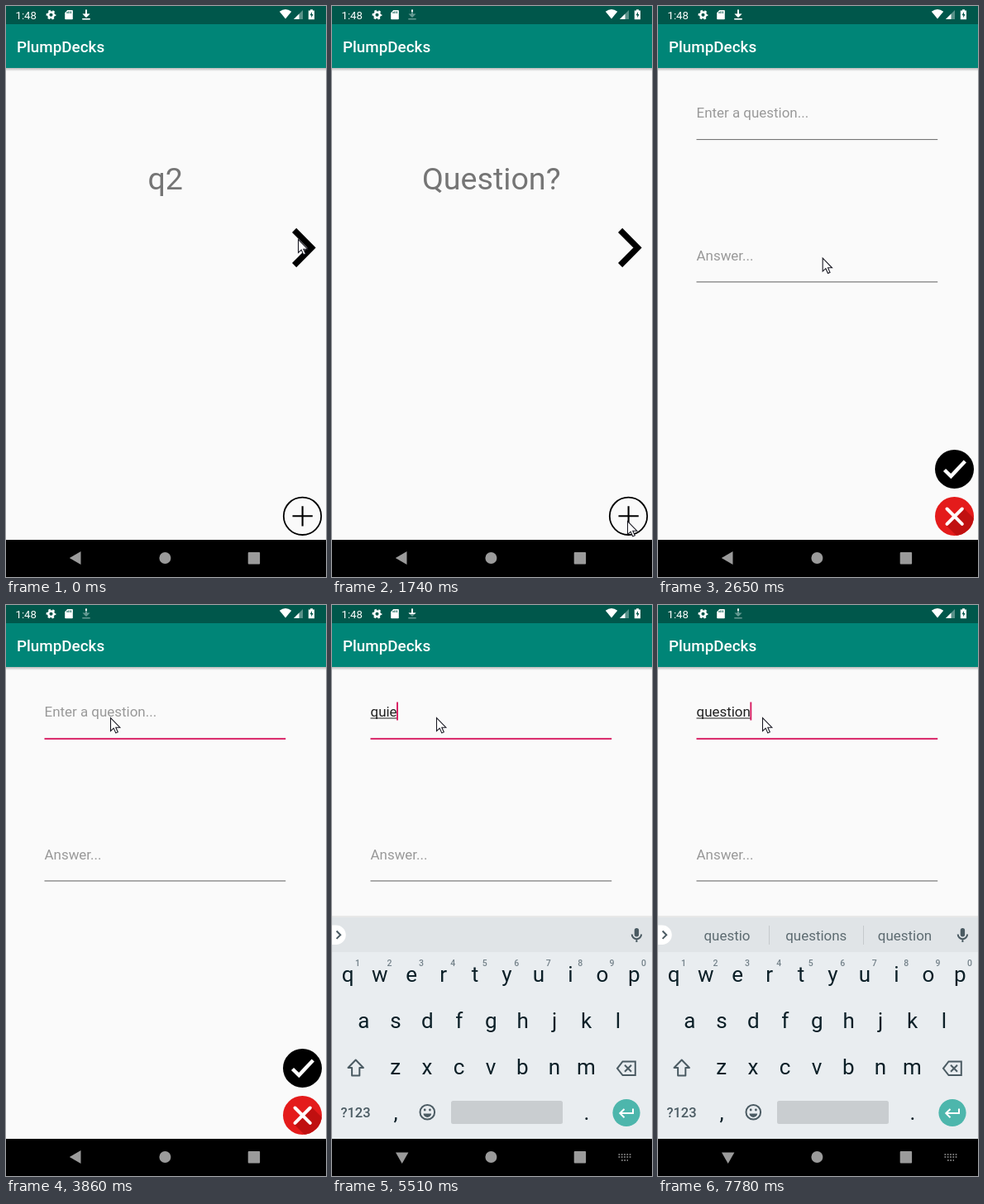
An HTML page for the animation above (8000 ms loop, 387 px wide and 691 px high).

```html
<!DOCTYPE html>
<html lang="en">
<head>
<meta charset="utf-8">
<title>Flash card app</title>
<style>
  html, body { margin: 0; width: 100%; height: 100%; overflow: hidden; background: #000; }
  svg { display: block; width: 387px; height: 691px; font-family: Roboto, sans-serif; }
  .title { font-size: 18.83px; font-weight: 500; fill: #fff; }
  .card { font-size: 37.64px; fill: #757575; text-anchor: middle; }
  .field { font-size: 16.94px; }
  .hint { fill: #999; }
  .mid { text-anchor: middle; }
  .key { font-size: 26px; fill: #0b1f27; text-anchor: middle; }
  .digit { font-size: 10.5px; font-weight: 500; fill: #74828a; text-anchor: middle; }
  .line { fill: none; stroke: #4b5b63; stroke-width: 2; }
  .word { font-size: 16.94px; fill: #5d6b71; text-anchor: middle; }
</style>
</head>
<body>
<svg viewBox="0 0 387 691">
  <defs>
    <linearGradient id="shade" x2="0" y2="1">
      <stop offset="0" stop-color="#000" stop-opacity=".26"/>
      <stop offset="1" stop-color="#000" stop-opacity="0"/>
    </linearGradient>
    <clipPath id="reveal"><rect id="revealBox" width="387" height="700"/></clipPath>
    <clipPath id="disc"><circle cx="358.5" cy="617.5" r="23.5"/></clipPath>
    <clipPath id="loaded"><rect id="loadedBox" x="90" y="3" width="14" height="15"/></clipPath>
    <g id="frame">
      <rect width="387" height="646" fill="#fafafa"/>
      <rect y="75" width="387" height="4" fill="url(#shade)"/>
      <rect y="22" width="387" height="53" fill="#008577"/>
      <rect y="-30" width="387" height="52" fill="#00574b"/>
      <text class="title" x="13" y="55.5">PlumpDecks</text>
    </g>
    <g id="download">
      <path d="M96 4.5h2v5h3.5L97 14l-4.5-4.5H96zM92.3 15h9.4v1.5h-9.4z"/>
    </g>
  </defs>

  <rect width="387" height="691"/>

  <g id="deck">
    <use href="#frame"/>
    <text id="card" class="card" x="192.7" y="222"></text>
    <path d="M348.6 271.4L369.5 292.5L348.6 313.6" fill="none" stroke="#000" stroke-width="7.3"/>
    <g fill="none" stroke="#000">
      <circle cx="358.5" cy="617.3" r="22.7" stroke-width="1.8"/>
      <path d="M346.5 617.3h24.3M358.6 605.2v24.3" stroke-width="2.1"/>
    </g>
    <rect id="dim" y="-30" width="387" height="740" opacity="0"/>
  </g>

  <g clip-path="url(#reveal)">
    <g id="form">
      <use href="#frame"/>
      <text id="hint" class="field hint" x="46.5" y="135">Enter a question...</text>
      <text id="entry" class="field" x="46.5" y="135" fill="#212121"></text>
      <rect id="under" x="46.5" y="136.5" height="1" fill="#212121"/>
      <rect id="caret" y="117.5" width="1.9" height="22" fill="#d81b60"/>
      <rect id="rule" x="46.5" width="291.7"/>
      <text class="field hint" x="46.5" y="307.7">Answer...</text>
      <rect x="46.5" y="333.2" width="291.7" height="1.4" fill="#8a8a8a"/>
      <circle cx="358.5" cy="560.5" r="23.5"/>
      <path d="M346.5 561.5l7.8 7.6L371.3 551" fill="none" stroke="#fff" stroke-width="4.4"/>
      <circle cx="358.5" cy="617.5" r="23.5" fill="#e41b1b"/>
      <path d="M370 608l30 30v20h-22L348 628z" fill="#c01010" clip-path="url(#disc)"/>
      <path d="M349.5 608.5l18.3 18.3M367.8 608.5l-18.3 18.3" stroke="#fff" stroke-width="4" stroke-linecap="round"/>
    </g>
  </g>

  <g fill="#fff">
    <text x="11.5" y="15.8" font-size="13.2">1:48</text>
    <g fill="none" stroke="#fff">
      <circle cx="54.5" cy="10.7" r="3.3" stroke-width="2.5"/>
      <circle cx="54.5" cy="10.7" r="5" stroke-width="1.8" stroke-dasharray="2.6 2.636" stroke-dashoffset="1.3"/>
    </g>
    <path d="M74.3 5H80q.8 0 .8.8v9.6q0 .8-.8.8h-8q-.8 0-.8-.8V8.2z"/>
    <path d="M74 7v2M76 6.4v2.6M78.3 6.4v2.6" stroke="#00574b"/>
    <use href="#download" opacity=".4"/>
    <use href="#download" clip-path="url(#loaded)"/>
    <path d="M330.8 6.8Q338 1.2 345.2 6.8L338 15.6z"/>
    <path d="M348 16h11V5z" opacity=".35"/>
    <path d="M348 16h6.5V9.5z"/>
    <path d="M368 4.2h3v1.2h2v10.8h-7.2V5.4h2.2z"/>
    <path d="M370 7l-2.4 4.3h1.6v3l2.4-4.3H370z" fill="#00574b"/>
  </g>

  <g fill="#9b9b9b">
    <path id="back"/>
    <circle cx="192.4" cy="668" r="7"/>
    <rect x="292.7" y="661" width="14.4" height="14.4" rx="1"/>
    <path id="switcher" d="M346.5 665h15M346.5 668h15M350 672h8" stroke="#9b9b9b" stroke-width="1.6" stroke-dasharray="1.7 1.6"/>
  </g>

  <g id="board">
    <rect y="376" width="387" height="2" opacity=".07"/>
    <rect y="378" width="387" height="42" fill="#e0e4e7"/>
    <rect y="420" width="387" height="226" fill="#e9edf0"/>
    <path d="M0 387.5h5a11.7 11.7 0 0 1 0 23.4H0z" fill="#fff"/>
    <path class="line" d="M5.5 394.5l4.7 4.7-4.7 4.7"/>
    <rect x="365.7" y="391" width="5.4" height="10.5" rx="2.7" fill="#4b5b63"/>
    <path class="line" d="M362.7 398.5a5.7 5.7 0 0 0 11.4 0M368.4 404.5v3.5" stroke-width="1.6"/>
    <g id="words">
      <path d="M134.5 388v23M248.5 388v23" stroke="#c5cacd"/>
      <text class="word" x="83.5" y="406"></text>
      <text class="word" x="191.3" y="406"></text>
      <text class="word" x="298.5" y="406"></text>
    </g>
    <g id="keys"></g>
    <path class="line" d="M28.7 550.5l9.2 9.5h-4.6v9.5h-9.2V560h-4.6z" stroke-linejoin="round"/>
    <path class="line" d="M351.5 552.5h15.3v16.5h-15.3l-6.5-8.2zM354 556.8l8 8M362 556.8l-8 8"/>
    <text class="mid" x="28.5" y="620" font-size="16.5" font-weight="500" fill="#4b5b63">?123</text>
    <circle class="line" cx="115.3" cy="613.8" r="8.8"/>
    <path d="M110.5 615.5h9.6a4.8 4.4 0 0 1-9.6 0z" fill="#4b5b63"/>
    <circle cx="112.2" cy="611" r="1.4" fill="#4b5b63"/>
    <circle cx="118.4" cy="611" r="1.4" fill="#4b5b63"/>
    <rect x="144" y="600" width="135" height="28" rx="2.5" fill="#c9cdd0"/>
    <circle cx="356" cy="614.5" r="16.6" fill="#4db6ac"/>
    <path d="M364 609.5v5.6h-15M353.5 610l-5.2 5.1 5.2 5.1" fill="none" stroke="#fff" stroke-width="2"/>
  </g>

  <path id="pointer" d="M0 0V16L3.7 12.6L6.3 18.4L8.8 17.3L6.3 11.7H11.3Z" fill="#fff" stroke="#1a1a24" stroke-width="1.1"/>
</svg>
<script>
const LOOP = 8000;
const $ = id => document.getElementById(id);
const set = (id, attrs) => { for (const k in attrs) $(id).setAttribute(k, attrs[k]); };
const show = (id, on) => set(id, { visibility: on ? "visible" : "hidden" });

const STEPS = [0, 250, 400, 560, 710, 870, 1030, 1190, 1340, 1540, 1740, 1990, 2140, 2290,
  2410, 2540, 2670, 2800, 2930, 3060, 3190, 3320, 3440, 3590, 3710, 3860, 4010, 4200, 4380, 4530,
  4810, 4930, 5510, 5650, 5780, 5920, 6050, 6180, 6320, 6450, 6570, 6690, 6810,
  7090, 7220, 7360, 7500, 7640, 7780];

const TYPED = [[0, ""], [4380, "q"], [4530, "qu"], [4930, "qui"], [5510, "quie"], [5920, "qui"],
  [6180, "qu"], [6570, "que"], [6690, "ques"], [6810, "quest"], [7220, "questi"],
  [7500, "questio"], [7640, "question"]];

const WORDS = [[0, ""], [5650, "quie quiet quite"], [5920, "qui quick quite"], [6180, "quite question quote"],
  [6570, "que question ques"], [7090, "quest question quests"], [7360, "questi question questions"],
  [7640, "questio questions question"]];

const BOARD = [[0, 0], [4810, .2], [4930, .6], [5510, 1]];

const PATH = [[0, 353.5, 282.5], [400, 353.5, 282.5], [1190, 357.5, 623.5], [1990, 357.5, 623.5],
  [2140, 260.5, 464.5], [2290, 222, 390], [2800, 175, 215], [3440, 126.5, 136.5], [LOOP, 126.5, 136.5]];

const latest = (list, t) => list.filter(e => e[0] <= t).pop()[1];

function pointerAt(t) {
  const i = PATH.findIndex(p => p[0] > t);
  const [t0, x0, y0] = PATH[i - 1], [t1, x1, y1] = PATH[i];
  const u = (t - t0) / (t1 - t0), e = u * u * (3 - 2 * u);
  return [x0 + (x1 - x0) * e, y0 + (y1 - y0) * e];
}

function buildKeys() {
  const label = (s, x, y, cls) => `<text class="${cls}" x="${x}" y="${y}">${s}</text>`;
  const row = (s, x, y, cls = "key", gap = 38.45) =>
    [...s].map((c, i) => label(c, x + gap * i, y, cls)).join("");
  $("keys").innerHTML = row("qwertyuiop", 19.2, 455.5) + row("1234567890", 31, 437.3, "digit") +
    row("asdfghjkl", 38.4, 511.5) + row("zxcvbnm", 76.6, 567.5) + row(",.", 77, 623, "key", 231);
}

function drawPages(t) {
  $("card").textContent = t < 400 ? "q2" : "Question?";
  const p = t < 2060 ? 0 : t > 2400 ? 1 : 1 - Math.pow(.35, (t - 2060) / 80);
  show("deck", p < 1);
  show("form", p > 0);
  set("deck", { transform: `translate(0 ${Math.round(-14 * p)})` });
  set("dim", { opacity: .1 * p });
  set("form", { transform: `translate(0 ${Math.round(28.6 * (1 - p))})` });
  set("revealBox", { y: Math.round(670 * Math.pow(1 - p, 2.25)) });
}

function drawEntry(t) {
  const text = latest(TYPED, t), focused = t >= 3710;
  $("entry").textContent = text;
  const width = text ? $("entry").getComputedTextLength() : 0;
  show("hint", t >= 2060 && !text);
  set("under", { width });
  set("caret", { x: 46 + width, opacity: (t >= 4010 && t < 4530) || t >= 5510 ? 1 : 0 });
  set("rule", focused ? { y: 160.9, height: 1.9, fill: "#d81b60" } : { y: 161, height: 1.1, fill: "#757575" });
}

function drawBoard(t) {
  const alpha = latest(BOARD, t), words = latest(WORDS, t).split(" ");
  set("board", { opacity: alpha, transform: `translate(0 ${alpha < 1 ? 42 : 0})` });
  show("words", words.length > 1);
  $("words").querySelectorAll("text").forEach((el, i) => el.textContent = words[i] || "");
  const open = t >= 4380;
  set("back", { d: open ? "M77 662.5h15.4L84.7 676z" : "M76.8 668L90.5 660v16z" });
  show("switcher", open);
}

function draw(time) {
  const t = STEPS.filter(s => s <= time).pop();
  drawPages(t);
  drawEntry(t);
  drawBoard(t);
  const phase = t % 1200;
  set("loadedBox", { height: phase < 200 || phase >= 800 ? 15 : phase < 600 ? 4 : 8 });
  set("pointer", { transform: `translate(${pointerAt(t)})` });
}

buildKeys();
const start = performance.now();
function tick() {
  draw((performance.now() - start) % LOOP);
  requestAnimationFrame(tick);
}
tick();
</script>
</body>
</html>
```
